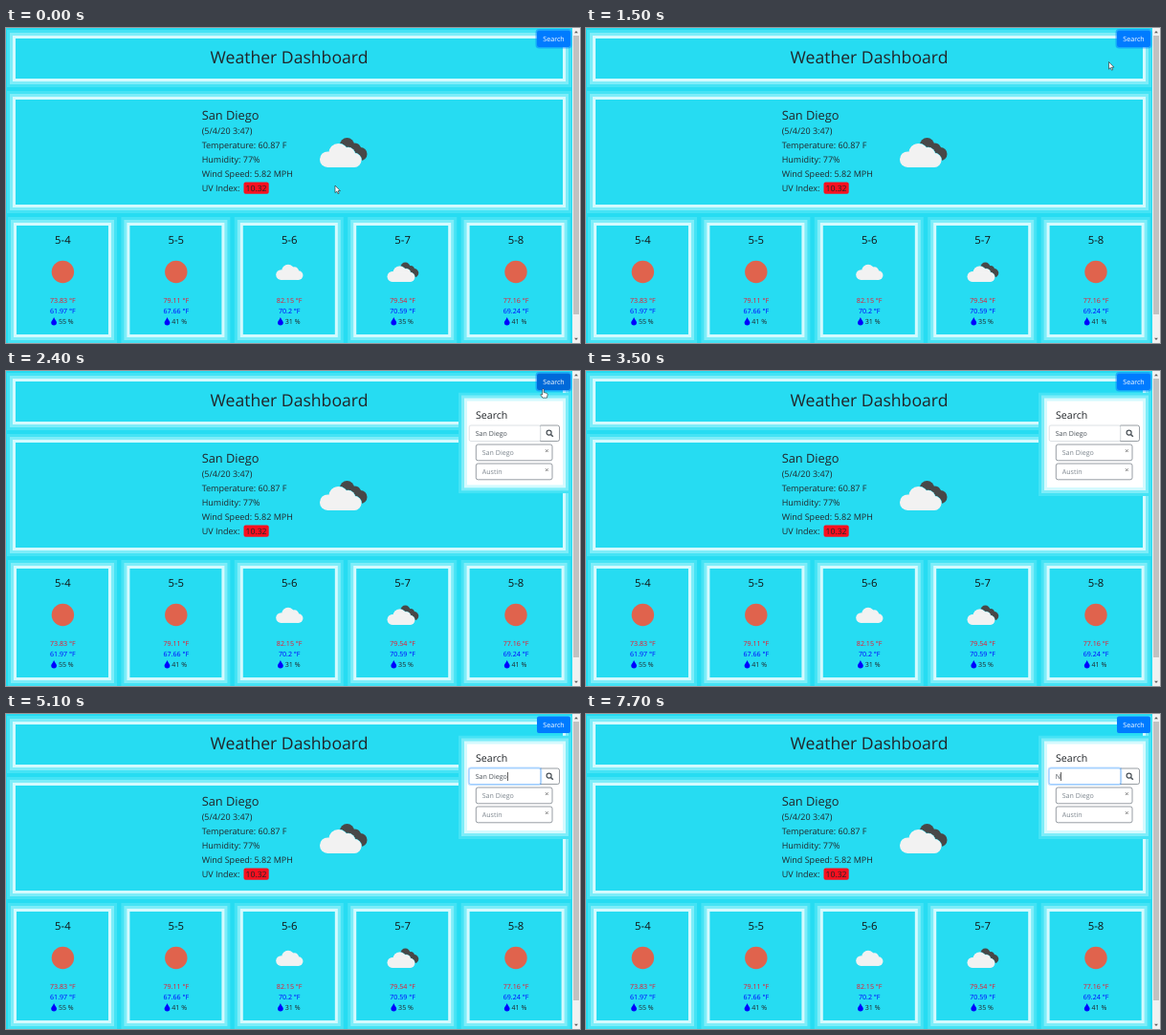
Animation of 600 by 330 pixels, one loop 8000 ms. Source, as an HTML page:

```html
<!DOCTYPE html>
<html lang="en">
<head>
<meta charset="utf-8">
<title>Weather Dashboard</title>
<style>
  html, body { margin: 0; width: 100%; height: 100%; overflow: hidden; background: #26dcf2; }
  svg { display: block; width: 600px; height: 330px; }
  text { font-family: "Open Sans", "Noto Sans", sans-serif; fill: #212529; text-rendering: geometricPrecision; }
  .medium { font-weight: 500; }
  .mid { text-anchor: middle; }
</style>
</head>
<body>
<svg id="stage" viewBox="0 0 600 330">
  <defs>
    <g id="whiteCloud" fill="#f2f2f2">
      <circle cx="8.3" cy="22.7" r="8.3"/>
      <circle cx="19.5" cy="16.3" r="10.3"/>
      <circle cx="29.5" cy="17.5" r="7.4"/>
      <circle cx="36" cy="23.5" r="7.5"/>
      <rect x="8" y="17" width="28" height="14"/>
    </g>
    <g id="clouds">
      <g fill="#484848">
        <circle cx="28.5" cy="7.5" r="7.5"/>
        <circle cx="37" cy="11" r="5.6"/>
        <circle cx="42.5" cy="17" r="7"/>
        <rect x="27" y="9" width="15.5" height="15"/>
      </g>
      <use href="#whiteCloud" stroke="#26dcf2" stroke-width="1"/>
      <use href="#whiteCloud"/>
    </g>
    <path id="drop" d="M0-4.3C.9-1.6 2.9-.4 2.9 1.4A2.9 2.9 0 0 1-2.9 1.4C-2.9-.4-.9-1.6 0-4.3Z" fill="#00f"/>
    <clipPath id="panelClip"><rect id="clipBox" x="473" y="22.5" width="118" height="0"/></clipPath>
  </defs>

  <rect width="600" height="330" fill="#26dcf2"/>
  <g id="page"></g>

  <g id="panel" clip-path="url(#panelClip)">
    <g id="panelBox"></g>
    <text class="medium" x="491" y="50" font-size="10.6">Search</text>
    <g fill="#fff" stroke="#6c757d" stroke-width=".7">
      <path d="M558.5 57H576.5a2 2 0 0 1 2 2V71.5a2 2 0 0 1-2 2H558.5Z"/>
      <g id="history"></g>
    </g>
    <g fill="none" stroke="#4a5157" stroke-width="1.2">
      <circle cx="567.6" cy="64.6" r="2.5"/>
      <path d="M569.5 66.5L571.8 68.8" stroke-width="1.6"/>
    </g>
    <rect id="glow" x="483.5" y="56.3" width="76" height="17.9" rx="2.5" fill="none" stroke="#007bff" stroke-opacity=".25" stroke-width="1.5"/>
    <rect id="field" x="484.2" y="57" width="74.6" height="16.5" rx="1.8" fill="#fff" stroke-width=".7"/>
    <text id="typed" x="490.7" y="68" font-size="7.1" style="fill:#495057"></text>
    <rect id="caret" y="61" width=".7" height="9" fill="#222"/>
  </g>

  <rect id="ring" x="554.3" y="1.8" width="36.4" height="18.9" rx="3" fill="none" stroke="#007bff" stroke-opacity=".5" stroke-width="1.6"/>
  <rect id="button" x="555" y="2.5" width="35" height="17.5" rx="2"/>
  <text class="mid" x="572.5" y="13.8" font-size="7.1" style="fill:#fff">Search</text>

  <rect x="592" width="8" height="330" fill="#f1f1f1"/>
  <rect x="593" y="8" width="6" height="292" fill="#c1c1c1"/>
  <path d="M594 5.2L596 3L598 5.2ZM594 324.8L596 327L598 324.8Z" fill="#606060"/>

  <g id="pointer" stroke="#222" fill="#fff" stroke-width=".6" stroke-linejoin="round">
    <path id="arrow" d="M0 0V7.6L1.8 6L3 8.7L4.2 8.2L3 5.6H5.4Z"/>
    <path id="hand" d="M-.8 1Q0-.5.8 1V4L3.8 4.8Q4.8 5.2 4.6 6.4L3.9 9.6H-.6L-2.7 6.4Q-2.6 5.2-.8 6.4Z"/>
  </g>
</svg>

<script>
const LOOP = 8000, STEP = 100;
const $ = id => document.getElementById(id);
const clamp = v => Math.max(0, Math.min(1, v));
const swing = p => .5 - Math.cos(Math.PI * clamp(p)) / 2;

// Nested inset bands shared by every box on the page.
const bands = [[0, '#45e3f5'], [3, '#7eedf9'], [6, '#d4fafe']];
function box(x, y, w, h, inner = '#26dcf2') {
  return [...bands, [9, inner]].map(([d, color]) =>
    `<rect x="${x + d}" y="${y + d}" width="${Math.max(0, w - 2 * d)}" height="${Math.max(0, h - 2 * d)}" fill="${color}"/>`
  ).join('');
}

const label = (x, y, size, str, cls = '', color = '#212529') =>
  `<text x="${x}" y="${y}" font-size="${size}" class="${cls}" style="fill:${color}">${str}</text>`;

const days = [
  ['5-4', 'sun', '73.83', '61.97', 55],
  ['5-5', 'sun', '79.11', '67.66', 41],
  ['5-6', 'white', '82.15', '70.2', 31],
  ['5-7', 'clouds', '79.54', '70.59', 35],
  ['5-8', 'sun', '77.16', '69.24', 41]
];

const icons = {
  sun: cx => `<circle cx="${cx}" cy="255.5" r="11.7" fill="#e0634d"/>`,
  white: cx => `<use href="#whiteCloud" transform="translate(${cx - 14} 243.8) scale(.65)"/>`,
  clouds: cx => `<use href="#clouds" transform="translate(${cx - 16} 245.5) scale(.66)"/>`
};

function dayCard([date, icon, high, low, humidity], i) {
  const x = 2 + 118.4 * i, cx = x + 57.4;
  return box(x, 198, 114, 132) + icons[icon](cx) +
    label(cx, 226, 11.3, date, 'mid medium', '#111') +
    label(cx, 287.6, 7.1, high + ' °F', 'mid', '#f0142a') +
    label(cx, 298.6, 7.1, low + ' °F', 'mid', '#00f') +
    `<use href="#drop" x="${cx - 9.3}" y="307.2"/>` +
    label(cx - 4.5, 310, 7.1, humidity + ' %');
}

const facts = ['(5/4/20 3:47)', 'Temperature: 60.87 F', 'Humidity: 77%', 'Wind Speed: 5.82 MPH', 'UV Index:'];

$('page').innerHTML =
  box(1, 2, 590, 60) + label(296, 37.3, 17.6, 'Weather Dashboard', 'mid medium') +
  box(1, 66, 590, 128) + label(204.7, 95.6, 12.8, 'San Diego', 'medium') +
  facts.map((fact, i) => label(204.7, 111 + 15 * i, 9, fact, 'medium')).join('') +
  '<rect x="248.5" y="161.5" width="26.2" height="12.3" rx="2" fill="#f8101f"/>' +
  label(250.6, 171, 8.6, '10.32', 'medium') +
  '<use href="#clouds" x="328" y="115"/>' +
  days.map(dayCard).join('');

$('history').innerHTML = ['San Diego', 'Austin'].map((city, i) => {
  const y = 77 + 20 * i;
  return `<rect x="491.3" y="${y}" width="79.7" height="16.8" rx="2"/>
    <g stroke="none">${label(497.7, y + 11.2, 7.1, city, '', '#7b848c')}</g>
    <path d="M563.9 ${y + 5.2}l2.8 2.8m0-2.8l-2.8 2.8" stroke="#555"/>`;
}).join('');

// Pointer stops: time, x, y
const stops = [[0, 344, 165], [1500, 546.5, 35.5], [1900, 561.5, 18.5], [2700, 561.5, 18.5], [3200, 553, 53]];
function pointerAt(t) {
  const i = stops.findIndex(s => s[0] > t);
  if (i < 0) return stops[stops.length - 1].slice(1);
  const [t0, x0, y0] = stops[i - 1], [t1, x1, y1] = stops[i];
  const p = swing((t - t0) / (t1 - t0));
  return [x0 + (x1 - x0) * p, y0 + (y1 - y0) * p];
}

const show = (id, on) => $(id).setAttribute('visibility', on ? 'visible' : 'hidden');

function draw(t) {
  const [x, y] = pointerAt(t);
  const hover = t < 3500 && x > 555 && x < 590 && y > 2 && y < 20;
  $('pointer').setAttribute('transform', `translate(${x} ${y})`);
  show('arrow', t < 3500 && !hover);
  show('hand', hover);
  $('button').setAttribute('fill', hover ? '#0069d9' : '#007bff');

  const height = 108.5 * swing((t - 2040) / 400);
  $('clipBox').setAttribute('height', height);
  $('panelBox').innerHTML = height ? box(473, 22.5, 118, height, '#fff') : '';

  const focus = clamp((t - 3950) / 200);
  $('ring').setAttribute('opacity', 1 - focus);
  $('glow').setAttribute('opacity', focus);
  $('field').setAttribute('stroke', focus > .5 ? '#80bdff' : '#ced4da');

  const value = t < 6700 ? 'San Diego' : t < 7700 ? '' : 'N';
  if ($('typed').textContent !== value) $('typed').textContent = value;
  const caretOn = t >= 4000 && t < 4500 || t >= 5100 && t < 5500 || t >= 6700;
  show('caret', caretOn);
  if (caretOn) $('caret').setAttribute('x', 490.9 + (value ? $('typed').getComputedTextLength() : 0));
}

function tick() {
  draw(Math.floor(performance.now() % LOOP / STEP) * STEP);
  requestAnimationFrame(tick);
}
tick();
</script>
</body>
</html>
```
